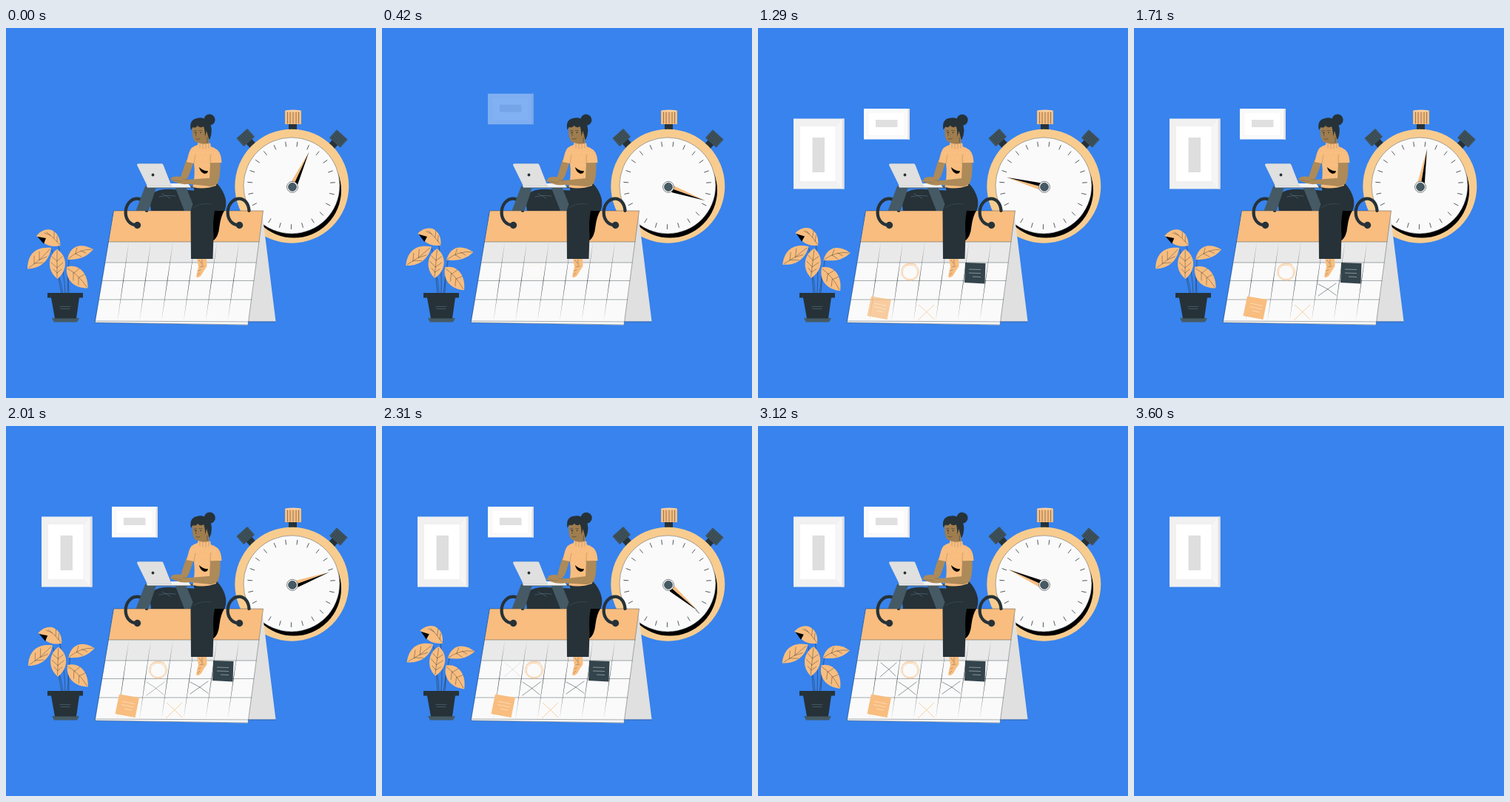
Animation of 500 by 500 pixels, one loop 3.63 s. Source, as an HTML page:

```html
<!DOCTYPE html>
<html lang="en">
<head>
<meta charset="utf-8">
<title>Planning the day</title>
<style>
  html, body { margin: 0; width: 100%; height: 100%; overflow: hidden; background: #3883ed; }
  svg { display: block; width: 100%; height: 100%; }
  .o { fill: #f8bd7f; } .d { fill: #263238; } .s { fill: #455a64; } .skin { fill: #ad8a58; } .face { fill: #a07d4e; }
  .g { fill: #e0e0e0; } .w { fill: #fafafa; } .ring { fill: #f8cc8f; }
  .line { fill: none; stroke: #263238; stroke-width: .5; stroke-linecap: round; }
  .pen { fill: none; stroke: #f8bd7f; stroke-width: .7; }
  .pale { fill: none; stroke: #fff; stroke-width: .6; opacity: .7; }
  .hook { fill: none; stroke: #263238; stroke-width: 4.2; stroke-linecap: round; }
</style>
</head>
<body>
<svg viewBox="0 0 500 500">
  <g id="tall">
    <path fill="#f1f1f1" d="M48 122.5h68.5v95H48z"/>
    <path class="g" d="M113.5 122.5h3v95h-3z"/>
    <path fill="#f6f6f6" d="M106 133l7.5-10v94.500l-7.500-10z"/>
    <path fill="#fff" stroke="#e6e6e6" stroke-width=".5" d="M56.500 132.500h49v75h-49z"/>
    <path fill="#dedede" d="M73.500 148H90v47H73.500z"/>
  </g>

  <g id="scene">
    <g id="wide">
      <path class="w" d="M143 109h62v41.500h-62z"/>
      <path class="g" d="M202.500 109h2.500v41.500h-2.500z"/>
      <path fill="#fff" stroke="#ececec" stroke-width=".5" d="M149 114h49.500v31.500H149z"/>
      <path class="g" d="M159 124h29.500v10H159z"/>
    </g>

    <g id="watch">
      <path class="d" d="M382 129h11v9h-11z"/>
      <g id="crown">
        <path class="o" d="M377 112h22v18h-22z"/>
        <ellipse cx="388" cy="112" rx="11" ry="1.500" fill="#fad0a0"/>
        <path class="line" d="M380.500 114v15M384 114v15M388 114v15M392 114v15M395.500 114v15"/>
      </g>
      <g id="knob" transform="translate(323.700 148) rotate(-42)">
        <path class="d" d="M-5 6h10v9h-10z"/>
        <rect x="-10" y="-7.500" width="20" height="15" rx="1" fill="#3f525b"/>
        <path class="line" d="M-6.500-6V6M-3.300-6V6M0-6V6M3.300-6V6M6.500-6V6"/>
      </g>
      <use href="#knob" transform="translate(773 1.500) scale(-1 1)"/>
      <circle class="ring" cx="386.300" cy="213.700" r="77"/>
      <circle cx="389" cy="219.600" r="64"/>
      <circle class="w" cx="386" cy="213" r="65" stroke="#263238" stroke-width=".4"/>
      <path id="ticks" class="line" style="stroke-width:.8"/>
      <g id="needle">
        <path class="o" d="M0 0L-4.700-7L0-53z"/>
        <path d="M0 0L4.700-7L0-53z"/>
      </g>
      <circle cx="387" cy="214.800" r="7.500" class="w" stroke="#263238" stroke-width=".6"/>
      <circle class="s" cx="387" cy="214.800" r="5.500" stroke="#263238" stroke-width=".6"/>
    </g>

    <g id="plant">
      <path class="line" d="M77 359Q75 345 71 334M80 359Q79 330 70 290M83 359Q84 345 83 325M85 359Q83 335 85 312M75 359Q70 330 62 300"/>
      <g class="o">
        <path d="M41 281Q49 271 60 272.500Q73 277 73.500 294Q61 297 52 291Q47 284 41 281z"/>
        <path d="M29 325.500C29 306 40 295 61 297C59 313 48 325 29 325.500z"/>
        <path d="M69 299C83 308 84 327 69.500 339C55 328 56 308 69 299z"/>
        <path d="M83 313C86 295 100 289 118 299C108 311 97 313 83 313z"/>
        <path d="M82 323C97 318 111 330 110.500 351.500C94 352 80 342 82 323z"/>
      </g>
      <path d="M42.500 282L54 284L51 291.500z"/>
      <path class="line" style="stroke-width:.4" d="M73 293Q64 283 55 276M65 284V275M60 280L52 277M69 289V281
        M31 324Q46 314 59 299M38 319V308M45 314V302M39 318L50 317M46 313L55 309
        M69 301V337M69 315L62 309M69 315L76 309M69 324L61 317M69 324L77 317M69 331L64 326M69 331L75 326
        M84 312Q98 299 116 299M94 305L96 297M101 301L108 304M94 305L102 309
        M83 325Q98 333 109 350M92 331L99 325M99 337L106 333M91 330V341M98 337V347"/>
    </g>
    <g id="pot">
      <path class="s" d="M62 392H99L96 397.500H65z"/>
      <path class="d" d="M56 358h48v6.500h-5L95 392.500H66L61 364.500h-5z"/>
      <path class="line" style="stroke:#607d8b" d="M73 376.500H87M74 379.500H86"/>
    </g>

    <g id="calendar">
      <path class="g" d="M346.500 252L364.500 396.500H326z"/>
      <path class="w" d="M146 247H347.500L327 401.500L120.500 398z"/>
      <path class="o" d="M146 247H347.500L341.800 289H139z"/>
      <path fill="#e9e9e9" d="M139 289H341.800L338 317H134.400z"/>
      <path id="rows" class="line" style="opacity:.8"/>
      <path id="columns" class="d" opacity=".85"/>
      <path class="line" style="stroke-width:.4" d="M146 247H347.500L327 401L120.500 398zM121 396L327.500 397H364"/>
    </g>

    <g id="marks">
      <g id="loop" class="pen">
        <ellipse cx="205.500" cy="329.500" rx="12" ry="11.500"/>
        <ellipse cx="205.500" cy="330" rx="10.300" ry="9.800"/>
        <path d="M195 323Q203 316 214 320"/>
      </g>
      <g id="noteA">
        <path fill="#34444c" d="M280 317L307.500 318L306.500 345.500L279 344z"/>
        <path class="pale" d="M285 326L301 326.500M285 331L301 331.500M290 336L301 336.500"/>
      </g>
      <g id="noteB">
        <path class="o" d="M153 362.500L180 367L174.500 394L147.500 389z"/>
        <path class="pale" d="M157 372L174 375.500M156 376.500L173 380M160 382L170 384"/>
      </g>
      <path id="crossA" class="pen" d="M217 374Q228 383 238 394M238 374L216 395"/>
      <path id="crossB" class="line" d="M249 346Q262 352 273 361M273 345L249 362"/>
      <path id="crossC" class="line" d="M190 346Q202 353 213 363M214 346L190 364"/>
      <path id="crossD" class="line" d="M166 320Q177 328 186 338M187 320L165 339"/>
    </g>

    <g id="hooks">
      <path class="hook" d="M190 247C189 225 166 226 162 245C160 258 167 266 177 266.500"/>
      <circle class="d" cx="177.500" cy="266.500" r="4.700"/>
      <path class="hook" d="M328.500 247C327 225 304 226 300 245C298 258 305 266 315 266.500"/>
      <circle class="d" cx="315.500" cy="266.500" r="4.700"/>
    </g>

    <g id="woman">
      <path class="d" d="M196 247Q193 231 199 223Q207 217 226 218L262 220V247z"/>
      <path class="line" style="stroke:#607d8b" d="M207 228Q219 225 229 227M211 224L222 230"/>
      <g id="desk">
        <path class="s" d="M188 214H203.500L192.500 247H175.500zM228 214H243L256 247H241z"/>
        <path class="s" d="M188 213.500H253V216.500H188z"/>
      </g>
      <g id="laptop">
        <path fill="#f2f2f2" d="M190 213L222 210H246L250 215.500H191z"/>
        <path fill="#c7c7c7" d="M178 183.500H211.500L224 214H192z"/>
        <path class="g" d="M178.500 183.500H210.500Q212 183.500 212.500 185L223.500 213.500H191L177.200 185.500Q176.500 183.500 178.500 183.500z"/>
        <circle class="d" cx="198.500" cy="198.500" r="1.900"/>
      </g>
      <path d="M278 246H295.500Q290 255 288.500 268Q287 284 279 288z"/>
      <path class="o" d="M258 311H271L271.500 322Q267 328 264 334Q260 339 257 336Q258 330 260 323z"/>
      <path class="line" style="opacity:.65" d="M261 314L264 318M265 313V321M262 323L267 322M260 328L263 327M259 334L262 331"/>
      <path class="d" d="M253 213L285 210Q294 219 297 232Q298 240 295.500 247H282Q279 262 280.500 280L279.500 312H250L249.500 248Q251 239 257 232z"/>
      <path class="line" style="stroke:#455a64" d="M253 243Q262 236 277 238"/>

      <g id="farArm">
        <path class="skin" d="M244 178L254 180Q250 193 247 201L241 208H235.500Q238 196 244 178z"/>
        <path class="skin" d="M247 201L240 209L226 207L224 203Q233 199 241 203z"/>
      </g>
      <path class="o" d="M259 158Q250 160 247.500 168L244 181L254 183Q256 198 252.500 215Q267 219 284 213Q283 198 286 182.500L291.500 182Q291 170 286 165Q281 161 276 160z"/>
      <path class="line" style="opacity:.4" d="M254 183L256 172M275 183L286 182.500M277 183Q275 176 277 171"/>
      <path fill="none" stroke="#fce0c0" stroke-width=".7" stroke-dasharray=".8 5" d="M253 168L284 169M257 176H274M257 185H273M256 201H280M256 209H282"/>
      <path d="M261 188Q267 194 273 193Q272 198 267 196.500Q262 194 261 188z"/>
      <path class="skin" d="M276 182.500L289.500 182Q290 198 287 208Q284 214 274 214L275 204z"/>
      <g id="nearArm">
        <path class="skin" d="M287 208Q284 214 274 214L247 212Q238 214 228 210L222 207Q222 205 225 205L238 205L248 206L276 203z"/>
        <path class="line" style="opacity:.4" d="M225 207.500L237 209M245 207Q242 206 239 206"/>
      </g>

      <g id="head">
        <path class="face" d="M252 131Q251 144 253.500 150Q256 156 262 155L261 160H274L275 138L268 127z"/>
        <circle class="d" cx="275" cy="124" r="7.600"/>
        <path class="d" d="M249.800 138Q247 124 258 122Q266 119.500 273 126Q279 132 277.500 142Q277 148 274.500 151L271 139L269 147Q269 138 267 133Q262 136 259 132Q256 136 252.500 134z"/>
        <path class="line" d="M253.500 139.500L257 138.500M261 138.500L265 139M257.500 140Q255.500 145 257 146M257 150Q260 151 262 149.500M272 148V155"/>
        <circle class="d" cx="255.800" cy="141.500" r=".8"/>
        <circle class="d" cx="263" cy="141.500" r=".8"/>
      </g>
      <path class="o" d="M259.500 155Q267 158 276 155.500L277.500 163Q267 166 258 162z"/>
      <path class="line" style="opacity:.4" d="M262 156.500V162M266 157V163M270 157V163M274 156.500V162"/>
    </g>
  </g>
</svg>

<script>
  const LOOP = 3630, CUT = 3600, TURN = 0.2016;
  const el = id => document.getElementById(id);
  const clamp = x => Math.max(0, Math.min(1, x));
  const span = (t, start, length) => clamp((t - start) / length);
  const ease = x => (1 - Math.cos(Math.PI * x)) / 2;
  const rotate = (id, deg, x, y) => el(id).setAttribute('transform', `rotate(${deg} ${x} ${y})`);

  // id, start and length of each fade on the calendar
  const fades = [
    ['loop', 380, 480], ['noteA', 600, 270], ['crossA', 930, 400], ['noteB', 1090, 270],
    ['crossB', 1420, 260], ['crossC', 1830, 270], ['crossD', 2240, 300]
  ];

  let ticks = '';
  for (let i = 0; i < 23; i++) {
    const a = (8 + i * 360 / 23) * Math.PI / 180;
    const at = r => `${385.6 + r * Math.sin(a)} ${212.6 - r * Math.cos(a)}`;
    ticks += `M${at(53)}L${at(59)}`;
  }
  el('ticks').setAttribute('d', ticks);

  let rows = '';
  for (const y of [289, 317, 341.5, 367])
    rows += `M${146 - (y - 247) * 0.166} ${y}H${347.5 - (y - 247) * 0.133}`;
  el('rows').setAttribute('d', rows);

  // Thin slivers, widest halfway down
  let columns = '';
  for (let i = 0; i < 6; i++) {
    const x = 166 + i * 29.8;
    columns += `M${x} 289L${x - 7.4} 343L${x - 15.5} 397L${x - 8.1} 343z`;
  }
  el('columns').setAttribute('d', columns);

  function slide(id, p, dx, dy) {
    el(id).setAttribute('transform', `translate(${dx * (1 - p)} ${dy * (1 - p)})`);
    el(id).setAttribute('opacity', p);
  }

  function draw(t) {
    const turn = TURN * t;
    const sway = (1 - Math.cos(turn * Math.PI / 180)) / 2;

    el('scene').setAttribute('visibility', t < CUT ? 'visible' : 'hidden');
    slide('wide', ease(span(t, 215, 500)), 0, -32);
    slide('tall', ease(span(t, 590, 490)), -42.5, 0);
    for (const [id, start, length] of fades)
      el(id).setAttribute('opacity', span(t, start, length));

    el('needle').setAttribute('transform', `translate(387 215.5) rotate(${24.8 + turn})`);
    rotate('plant', 11.7 * sway, 80, 358);
    rotate('head', 3 * sway, 267, 158);
    rotate('nearArm', 2 - 3.5 * sway, 284, 209);
    rotate('farArm', 2 - 3.5 * sway, 249, 180);
  }

  const began = performance.now();
  function tick() {
    draw((performance.now() - began) % LOOP);
    requestAnimationFrame(tick);
  }
  draw(0);
  requestAnimationFrame(tick);
</script>
</body>
</html>
```
